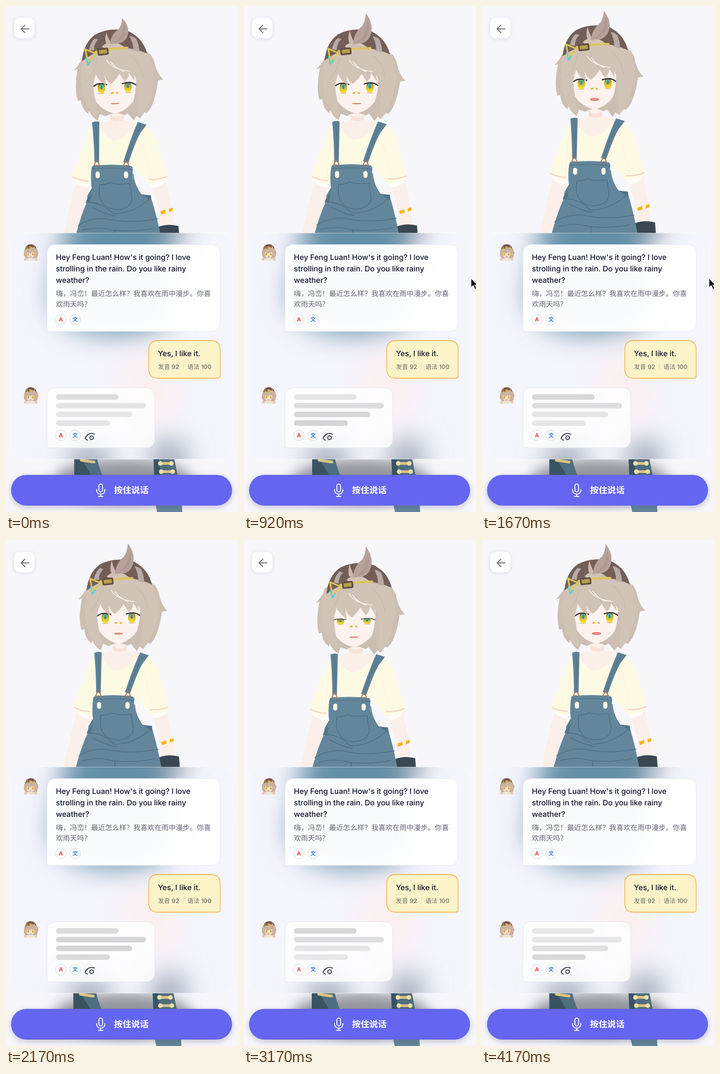
Animation, 507 px wide and 1104 px high, one loop 4260 ms. Source, as an HTML page:

```html
<!DOCTYPE html>
<html lang="zh-CN">
<head>
<meta charset="utf-8">
<title>Speaking practice</title>
<style>
html, body { margin: 0; width: 100%; height: 100%; overflow: hidden; background: #f7f7fb; }
svg { display: block; }
text { font-family: Inter, "Noto Sans CJK SC", "Noto Sans CJK", sans-serif; text-rendering: geometricPrecision; }
.en { font-size: 16.5px; font-weight: 500; fill: #10142b; }
.zh { font-size: 15.4px; fill: #626675; }
.score { font-size: 13.2px; font-weight: 500; fill: #6b6b70; }
.bubble { fill: #fff; stroke: #e3e5ef; }
.line { fill: none; stroke-linecap: round; stroke-linejoin: round; }
.seam { stroke: #4b6c82; stroke-width: 1.5; }
.small { filter: saturate(2) brightness(.92); }
</style>
</head>
<body>
<svg width="507" height="1104" viewBox="0 0 507 1104">
<defs>
  <filter id="haze" x="-60%" y="-60%" width="220%" height="220%"><feGaussianBlur stdDeviation="31"/></filter>
  <filter id="soft" x="-30%" y="-80%" width="160%" height="260%"><feGaussianBlur stdDeviation="15"/></filter>
  <clipPath id="cardClip"><rect x="11" y="495" width="485" height="494" rx="26"/></clipPath>
  <linearGradient id="iris" x2="0" y2="1">
    <stop offset="0" stop-color="#6d5726"/><stop offset=".45" stop-color="#dfb51c"/><stop offset="1" stop-color="#fce52c"/>
  </linearGradient>
  <g id="tools">
    <circle cx="120" r="11.5" fill="#fff" stroke="#cfd2df"/>
    <circle cx="151" r="11.5" fill="#fff" stroke="#cfd2df"/>
    <text x="120" y="4.3" text-anchor="middle" font-size="12" font-weight="700" fill="#ee3b42">A</text>
    <text x="151" y="4.3" text-anchor="middle" font-size="12" font-weight="700" fill="#3478ef">文</text>
  </g>
  <g id="eye">
    <path d="M-14-5Q0-13 12-6L11 7Q0 14-10 7Z" fill="#fffaf8"/>
    <ellipse rx="8.5" ry="11.5" fill="url(#iris)"/>
    <rect x="-4" y="-9" width="8" height="11" rx="3.5" fill="#45c4c0"/>
    <rect x="-1.8" y="-7" width="3.6" height="9" rx="1.8" fill="#8a7430"/>
    <path class="line" d="M-17-5Q-6-14 12-8" stroke="#3b2f2c" stroke-width="2.6"/>
    <path class="line" d="M-7 11.500Q0 13 6 11" stroke="#a98c7c" stroke-width=".8"/>
  </g>
  <g id="avatar">
    <use href="#hairBack"/><use href="#skin"/>
    <ellipse cx="217" cy="180" rx="9" ry="13" fill="#d5a52a"/><ellipse cx="275" cy="180" rx="9" ry="13" fill="#d5a52a"/>
    <path class="line" d="M236 213h20" stroke="#d88472" stroke-width="6"/>
    <use href="#bangs"/><use href="#cap"/>
    <path d="M165 235Q246 215 330 235L320 258H175Z" fill="#fffaf0"/>
    <circle cx="178" cy="243" r="17" fill="#f8dfd3"/><circle cx="316" cy="243" r="17" fill="#f8dfd3"/>
  </g>
</defs>

<ellipse cx="256" cy="1035" rx="150" ry="48" fill="#444954" opacity=".55" filter="url(#soft)"/>

<g id="feet">
  <path d="M149 985H198Q203 1008 213 1030H149Z" fill="#4f6f81"/>
  <path d="M149 985H163L190 1030H149Z" fill="#3a5363"/>
  <path d="M322 985H367L376 1030H324Z" fill="#4f6f81"/>
  <path d="M322 985H334L337 1030H324Z" fill="#3a5363"/>
  <path d="M326 1085H384L385 1104H330Z" fill="#64869a"/>
  <g class="line" stroke="#dcc481" stroke-width="6"><path d="M164 991L192 995M337 998H361M339 1016H365"/></g>
  <g fill="#f2dfa5"><circle cx="337" cy="998" r="5"/><circle cx="361" cy="998" r="5"/><circle cx="339" cy="1016" r="5"/><circle cx="364" cy="1016" r="5"/></g>
</g>

<g id="body">
  <path d="M155 380L184 388Q174 440 153 520H122Q139 440 155 380ZM320 388L351 380Q365 430 369 484L340 488Q338 440 320 388Z" fill="#fbefe9"/>
  <path d="M339 447L366 439V446L341 454Z" fill="#fcb21d"/><path d="M350 444L358 441V449L351 451Z" fill="#fff4d9"/>
  <path d="M334 481Q355 473 378 479L380 503H330Z" fill="#3a4753"/>
  <path d="M206 255Q191 258 183 277L146 374Q160 389 184 389L194 350H282L318 391Q341 390 357 376L333 290Q322 260 295 253Z" fill="#fdfae4"/>
  <path d="M152 377Q164 388 184 388L181 396Q164 394 155 384ZM318 388L351 379L347 386Q335 396 322 395Z" fill="#fffefa"/>
  <path class="line" d="M149 372Q163 380 183 381M315 377Q334 379 354 371" stroke="#f2d3c5" stroke-width="2.5"/>
  <path class="line" d="M188 300L182 370M303 300L320 365" stroke="#f5f0da"/>
  <path d="M207 255L233 248V220H263V248L288 253Q267 292 238 292Q218 284 207 255Z" fill="#fbefe9"/>
  <path d="M233 235Q249 251 263 235V247Q248 255 233 247Z" fill="#f7e2d9"/>
  <path d="M193 253Q201 249 209 252L207 340H197Q197 295 193 253ZM293 252L312 258L303 270Q292 281 271 342L260 339Q278 285 293 252Z" fill="#5d8096"/>
  <path class="line" d="M202 258L204 334M300 260Q282 285 267 336" stroke="#4f7086"/>
  <path d="M191 350Q193 346 201 347Q235 343 277 348Q281 350 280 358Q278 382 296 409L318 414Q330 450 343 520H148Q163 460 179 427L180 413L190 397Q187 372 191 350Z" fill="#64869a"/>
  <g class="line seam">
    <path d="M192 355Q235 350 280 356" stroke-dasharray="4 3"/>
    <path d="M207 389Q222 389 230 384Q248 390 273 386L278 419Q275 441 245 443Q211 442 206 410Z"/>
    <path d="M189 399Q184 419 177 428Q210 425 236 452Q280 453 319 417M159 478Q185 461 219 463Q270 475 333 463M190 439Q230 458 242 457M167 488Q205 479 232 488Q278 493 325 484M238 489V510M281 366Q282 389 298 411"/>
  </g>
  <path d="M177 424L190 410L185 428ZM299 410L319 412V424Z" fill="#4f7288"/>
  <path class="line" d="M201 335L196 347H208L204 338M266 336L260 347H272L268 338" stroke="#a37463" stroke-width="2"/>
  <rect x="199" y="360" width="9" height="15" rx="4.5" fill="#fff8e9"/><rect x="261" y="360" width="9" height="15" rx="4.5" fill="#fff8e9"/>
</g>

<g id="head">
  <path id="hairBack" d="M177 112Q170 126 158 138L166 136Q157 180 165 205L171 203Q173 224 187 234L188 227Q196 243 207 249L212 235L225 240Q246 228 266 239L273 235L286 251L292 241L300 247Q310 228 314 236Q333 220 341 165L353 163Q338 150 333 120L325 106Z" fill="#cdbeb2"/>
  <g id="face">
    <path id="skin" d="M200 137H292Q297 173 286 208Q271 229 246 235Q219 229 204 207Q195 175 200 137Z" fill="#fdf2ed"/>
    <g transform="translate(217 179)"><use class="eye" href="#eye"/></g>
    <g transform="translate(275 178) scale(-1 1)"><use class="eye" href="#eye"/></g>
    <path class="line" d="M211 152Q216 155 221 157" stroke="#65534c" stroke-width="2"/>
    <path class="line" d="M239 190Q246 187 252 190" stroke="#efac37" stroke-width="3.5"/><path d="M243 187h6v4h-6z" fill="#fff3d4"/>
    <ellipse id="mouth" cx="246" cy="213" rx="9.5" fill="#ee8d80" stroke="#c87b6c"/>
  </g>
  <path id="bangs" d="M178 107Q210 88 247 88Q301 83 321 104Q333 130 333 158Q328 205 306 239L296 242Q301 198 296 166L289 151L290 165L278 146Q278 159 268 165Q262 155 257 148Q250 161 238 170Q230 166 224 152L227 172Q211 164 206 148Q200 164 199 176Q204 215 209 238L201 240Q180 218 175 190Q169 150 178 107Z" fill="#d2c3b7"/>
  <g class="line" stroke="#c4b4a8"><path d="M210 113Q203 145 185 163M273 102Q305 121 309 158M258 148Q252 133 237 123"/></g>
  <path class="line" d="M230 118Q242 139 281 143M238 121Q250 137 267 143" stroke="#fffaf4" stroke-width="1.5"/>
  <g id="cap">
    <path d="M176 119Q180 80 205 62Q238 44 280 56Q311 72 319 106Q295 93 255 91Q213 91 176 119Z" fill="#735f58"/>
    <path d="M192 94Q196 77 205 70L213 72Q203 80 203 96ZM281 66Q289 66 296 73Q302 88 302 101L289 99Q290 83 281 66Z" fill="#b8aaa5"/>
    <path d="M220 88Q243 66 274 94L318 106Q299 114 273 106Q255 93 236 100Z" fill="#d2c3b7"/>
    <path class="line" d="M207 99Q240 92 276 92" stroke="#dcc45c" stroke-width="5"/>
    <rect x="212" y="93" width="21" height="12" rx="2" fill="#b79e49" stroke="#5f4d46" stroke-width="3.5" transform="rotate(-6 222 99)"/>
    <path class="line" d="M184 93L208 103L189 121Z" stroke="#dcc855" stroke-width="3.5"/>
    <path class="line" d="M185 111L189 127L195 118" stroke="#3ed5dc" stroke-width="2.5"/>
  </g>
  <g id="tuft">
    <path d="M231 53Q226 69 230 80L246 87Q236 75 231 53Z" fill="#cdb9ad"/>
    <path d="M266 15Q280 34 279 51Q277 75 259 81L238 83Q240 58 258 44Q266 32 266 15Z" fill="#b7a29b"/>
    <path d="M269 30Q278 52 265 70Q257 78 244 80Q270 64 269 30Z" fill="#9f8984" opacity=".4"/>
  </g>
</g>

<g filter="drop-shadow(0 1px 3px #3332)"><rect x="17" y="25" width="46" height="46" rx="13" fill="#fff" stroke="#e9eaf1"/></g>
<path class="line" d="M50 50H33M41 42L33 50L41 58" stroke="#696d78" stroke-width="2.2"/>

<g clip-path="url(#cardClip)">
  <rect x="11" y="495" width="485" height="494" fill="#f5f5fd"/>
  <g filter="url(#haze)">
    <path d="M142 425H346L362 590L350 695Q250 735 140 695L100 650Z" fill="#6390a7"/>
    <path d="M335 440H385V505H340Z" fill="#66727f"/>
    <ellipse cx="310" cy="835" rx="60" ry="75" fill="#fcefee"/>
    <path d="M145 965H222V1040H140ZM323 950H387V1040H325Z" fill="#8d99a8"/>
  </g>
  <rect x="11.5" y="495.5" width="484" height="493" rx="26" fill="none" stroke="#fff" opacity=".5"/>
</g>

<path class="bubble" fill-opacity=".96" d="M109 520.5H448Q468 520.5 468 541V690Q468 710 448 710H94Q89.500 710 89.500 705V541Q89.500 520.500 109 520.500Z"/>
<text class="en"><tspan x="109" y="554">Hey Feng Luan! How's it going? I love</tspan><tspan x="109" y="579.3">strolling in the rain. Do you like rainy</tspan><tspan x="109" y="604">weather?</tspan></text>
<text class="zh"><tspan x="109" y="633">嗨，冯峦！最近怎么样？我喜欢在雨中漫步。你喜</tspan><tspan x="109" y="656">欢雨天吗？</tspan></text>
<use href="#tools" y="684"/>

<path d="M332 730H448Q468 730 468 750V807Q468 812 463 812H332Q312 812 312 792V750Q312 730 332 730Z" fill="#fdf3c9" stroke="#f7a72b" stroke-width="1.3"/>
<text class="en" x="332" y="763.5">Yes, I like it.</text>
<text class="score" y="791.5"><tspan x="332">发音 92</tspan><tspan x="396.500">语法 100</tspan></text>
<path d="M387.500 779V794" stroke="#dcd7c4"/>

<path class="bubble" fill-opacity=".78" d="M109 832.5H305Q325 832.500 325 852V944Q325 964 305 964H94Q89.500 964 89.500 959V852Q89.500 832.500 109 832.500Z"/>
<g id="bars">
  <rect x="109" y="847" width="137" height="12" rx="6"/>
  <rect x="109" y="866" width="197" height="12" rx="6"/>
  <rect x="109" y="885" width="167" height="12" rx="6"/>
  <rect x="109" y="904" width="118" height="12" rx="6"/>
</g>
<use href="#tools" y="937"/>
<circle cx="182" cy="937" r="11.5" fill="#fff" stroke="#d9dbe5"/>
<g class="line" stroke="#333a4e" stroke-width="2.2"><path d="M173 944Q174 938 181 934Q187 931 193 934M175 946L178 947"/><circle cx="187" cy="942" r="4"/></g>

<use class="small" href="#avatar" transform="translate(11.500 511) scale(.172)"/>
<use class="small" href="#avatar" transform="translate(11.500 823) scale(.172)"/>

<g filter="drop-shadow(0 4px 7px #3c3e7048)"><rect x="11" y="1023" width="483" height="67" rx="33.5" fill="#6466f1"/></g>
<g class="line" stroke="#fff" stroke-width="2"><rect x="203" y="1043" width="8" height="17" rx="4"/><path d="M198 1055V1057Q199 1065 207 1065T216 1057V1055M207 1065V1070M202 1070H212"/></g>
<text x="236" y="1063" font-size="18.9" font-weight="700" fill="#fff">按住说话</text>

<path id="cursor" d="M0 0V20L5 16L8.500 24L12 22L8.500 15H15Z" fill="#111" stroke="#fff" stroke-width="1.3"/>
</svg>
<script>
const LOOP = 4260, STEP = 83.3;
// time, head x, head y, head tilt, face turn, tuft height, body x, body y, lean, eye opening, mouth opening
const poses = [
  [0,    -7,  0, -1.5, 0, .84, -1, 1, -4, 1, .7],
  [460,  -2, -4, -.5, 0, 1,    0, -2, -1, 1, 1.8],
  [920,   0,  0,  0,  0, 1,    0, 0,  0,  1, .7],
  [1670,  0, -9,  0,  0, .94,  0, -7, 0,  1, 2.8],
  [2080,  0, -9,  0,  0, .99,  0, -7, 0,  1, 1.6],
  [2670,  0, -1,  0,  0, 1.02, 0, 0,  0,  1, 1.5],
  [3170, -1, -1,  0,  5, 1,   -4, -3, 0, .55, .9],
  [3670, -1, -9, -1,  9, .93, -4, -6, 0,  1, 1.8],
  [4170,  4, -9,  0,  0, .97,  4, -7, 0,  1, 2.6]
];
const $ = id => document.getElementById(id);
const move = (id, value) => $(id).setAttribute('transform', value);
const clamp = v => Math.max(0, Math.min(1, v));
const ease = v => { v = clamp(v); return v * v * (3 - 2 * v); };

function poseAt(t) {
  let i = poses.length - 2;
  while (i && poses[i][0] > t) i--;
  const [a, b] = [poses[i], poses[i + 1]];
  const k = ease((t - a[0]) / (b[0] - a[0]));
  return a.map((v, j) => v + (b[j] - v) * k);
}

function draw(t) {
  const [, hx, hy, tilt, turn, tuft, bx, by, lean, eye, mouth] = poseAt(t);
  move('head', `translate(${hx} ${hy}) rotate(${tilt} 246 235)`);
  move('face', `translate(${-turn} 0)`);
  move('bangs', `translate(${-turn * .35} 0)`);
  move('cap', `translate(${turn} 0)`);
  move('tuft', `translate(${turn * .2} ${85 * (1 - tuft)}) scale(1 ${tuft})`);
  move('body', `matrix(1 0 ${-lean / 240} 1 ${bx + lean * 495 / 240} ${by})`);
  move('feet', `translate(${by * .25} 0)`);
  for (const e of document.querySelectorAll('.eye')) e.setAttribute('transform', `scale(1 ${eye})`);
  $('mouth').setAttribute('ry', mouth);

  [...$('bars').children].forEach((bar, i) => {
    const glow = Math.cos((t - 340 - i * 200) / 1500 * 2 * Math.PI);
    const c = Math.round(222 - 9 * glow);
    bar.setAttribute('fill', `rgb(${c},${c},${c + 3})`);
  });

  const away = 1 - ease((t - 250) / 330) + ease((t - 2000) / 260);
  move('cursor', `translate(${496 + 16 * away} 594)`);
}

function tick(now) {
  draw(Math.floor((now % LOOP + 4) / STEP) * STEP);
  requestAnimationFrame(tick);
}
draw(0);
requestAnimationFrame(tick);
</script>
</body>
</html>
```
